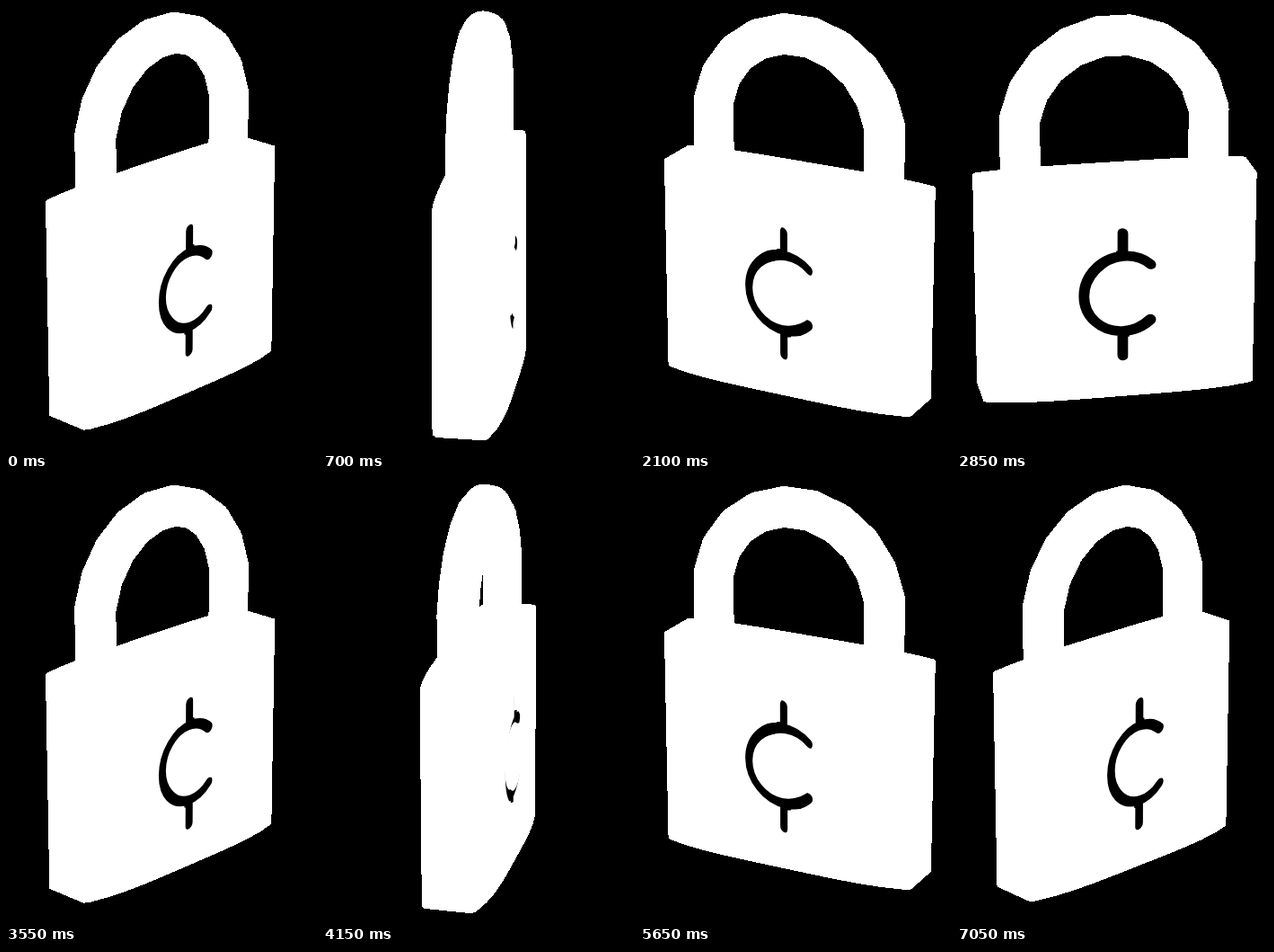
Animation of 346x495 px, one loop 7100 ms. Source, as an HTML page:

```html
<!DOCTYPE html>
<html lang="en">
<head>
<meta charset="utf-8">
<title>Turning padlock</title>
<style>
  html, body { margin: 0; width: 100%; height: 100%; overflow: hidden; background: #000; }
  svg { display: block; width: 100vw; height: 100vh; }
  .lock { fill: #fff; stroke: #fff; stroke-width: 0; stroke-linecap: round; shape-rendering: crispEdges; }
  .cent { fill: none; stroke-width: 13.4; stroke-linecap: round; }
</style>
</head>
<body>
<svg viewBox="0 0 346 495">
  <defs>
    <mask id="rim" maskUnits="userSpaceOnUse" x="0" y="0" width="346" height="495">
      <path id="rimCent" class="cent" stroke="#fff"/>
    </mask>
  </defs>
  <rect width="346" height="495"/>
  <g class="lock">
    <g id="shackle"></g>
    <polygon id="body"/>
  </g>
  <g mask="url(#rim)"><path id="floorCent" class="cent" stroke="#000"/></g>
</svg>
<script>
const HALF_TURN = 3550, STEP = 50, START_ANGLE = 46.15;
const CAMERA = { x: 175.5, y: 302, distance: 2850, sin: 0.37, cos: 0.929 };
const BODY = {
  faceX: 149, faceZ: 30, sideX: 153.5, sideZ: 26.5,
  levels: [{ y: 123, bulge: 7.5 }, { y: -126.5, bulge: 11 }]
};
const SHACKLE = { radius: 104.5, tube: 22, springY: 174.5, footY: 108, corners: 10 };
// The sign is sunk into the face; its floor lies a little aside of its rim.
const CENT = { rim: { x: -1.15, z: 39.2 }, floor: { x: 1.15, z: 35.2 } };

const byId = id => document.getElementById(id);
const rad = degrees => degrees * Math.PI / 180;

function makeProjector(angle) {
  const c = Math.cos(angle), s = Math.sin(angle);
  return ([x, y, z]) => {
    const turnedX = x * c + z * s, turnedZ = z * c - x * s;
    const depth = y * CAMERA.sin + turnedZ * CAMERA.cos;
    const scale = CAMERA.distance / (CAMERA.distance - depth);
    return {
      x: CAMERA.x + turnedX * scale,
      y: CAMERA.y - (y * CAMERA.cos - turnedZ * CAMERA.sin) * scale,
      scale
    };
  };
}

// Both large faces bulge slightly; the upright edges are bevelled.
function bodyPoints() {
  const points = [];
  for (const { y, bulge } of BODY.levels)
    for (const side of [-1, 1]) {
      for (let i = -6; i <= 6; i++) {
        const u = i / 6;
        points.push([u * BODY.faceX, y, side * (BODY.faceZ + bulge * (1 - u ** 4))]);
      }
      points.push([BODY.sideX, y, side * BODY.sideZ], [-BODY.sideX, y, side * BODY.sideZ]);
    }
  return points;
}

// The arch is a coarse polygon around a half circle.
function shacklePoints() {
  const { radius, springY, footY, corners } = SHACKLE;
  const step = Math.PI / corners, reach = radius / Math.cos(step / 2);
  const points = [[radius, footY, 0]];
  for (let i = 0; i < corners; i++) {
    const a = (i + 0.5) * step;
    points.push([reach * Math.cos(a), springY + reach * Math.sin(a), 0]);
  }
  points.push([-radius, footY, 0]);
  return points;
}

function centPath() {
  const x = 3, y = -4.7, r = 44.4, a = rad(47);
  const endX = x + r * Math.cos(a), dy = r * Math.sin(a);
  return `M${endX} ${y + dy}A${r} ${r} 0 1 1 ${endX} ${y - dy}M2 67V${y + r}M2 -78V${y - r}`;
}

function convexHull(points) {
  const sorted = [...points].sort((p, q) => p.x - q.x || p.y - q.y);
  const turn = (o, p, q) => (p.x - o.x) * (q.y - o.y) - (p.y - o.y) * (q.x - o.x);
  const chain = list => {
    const out = [];
    for (const p of list) {
      while (out.length > 1 && turn(out.at(-2), out.at(-1), p) <= 0) out.pop();
      out.push(p);
    }
    return out.slice(0, -1);
  };
  return [...chain(sorted), ...chain(sorted.reverse())];
}

function planeMatrix(project, { x, z }) {
  const span = 50;
  const o = project([x, 0, z]);
  const right = project([x + span, 0, z]), left = project([x - span, 0, z]);
  const up = project([x, span, z]), down = project([x, -span, z]);
  const slope = (p, q, axis) => (p[axis] - q[axis]) / (2 * span);
  return `matrix(${[slope(right, left, 'x'), slope(right, left, 'y'),
    slope(up, down, 'x'), slope(up, down, 'y'), o.x, o.y].map(v => v.toFixed(5))})`;
}

const bodyModel = bodyPoints(), shackleModel = shacklePoints();
const links = shackleModel.slice(1).map(() =>
  byId('shackle').appendChild(document.createElementNS('http://www.w3.org/2000/svg', 'line')));
const body = byId('body'), rimCent = byId('rimCent'), floorCent = byId('floorCent');
rimCent.setAttribute('d', centPath());
floorCent.setAttribute('d', centPath());

function draw(time) {
  const stepped = Math.floor(time / STEP) * STEP % HALF_TURN;
  // The lock looks alike from both sides, so the angle stays within -90..90.
  const degrees = (START_ANGLE + 180 * stepped / HALF_TURN + 90) % 180 - 90;
  const project = makeProjector(rad(degrees));

  body.setAttribute('points', convexHull(bodyModel.map(project))
    .map(p => `${p.x.toFixed(2)},${p.y.toFixed(2)}`).join(' '));

  const arch = shackleModel.map(project);
  links.forEach((link, i) => {
    const p = arch[i], q = arch[i + 1];
    link.setAttribute('x1', p.x);
    link.setAttribute('y1', p.y);
    link.setAttribute('x2', q.x);
    link.setAttribute('y2', q.y);
    link.setAttribute('stroke-width', SHACKLE.tube * (p.scale + q.scale));
  });

  rimCent.setAttribute('transform', planeMatrix(project, CENT.rim));
  floorCent.setAttribute('transform', planeMatrix(project, CENT.floor));
}

function tick() {
  draw(performance.now());
  requestAnimationFrame(tick);
}
draw(0);
requestAnimationFrame(tick);
</script>
</body>
</html>
```
